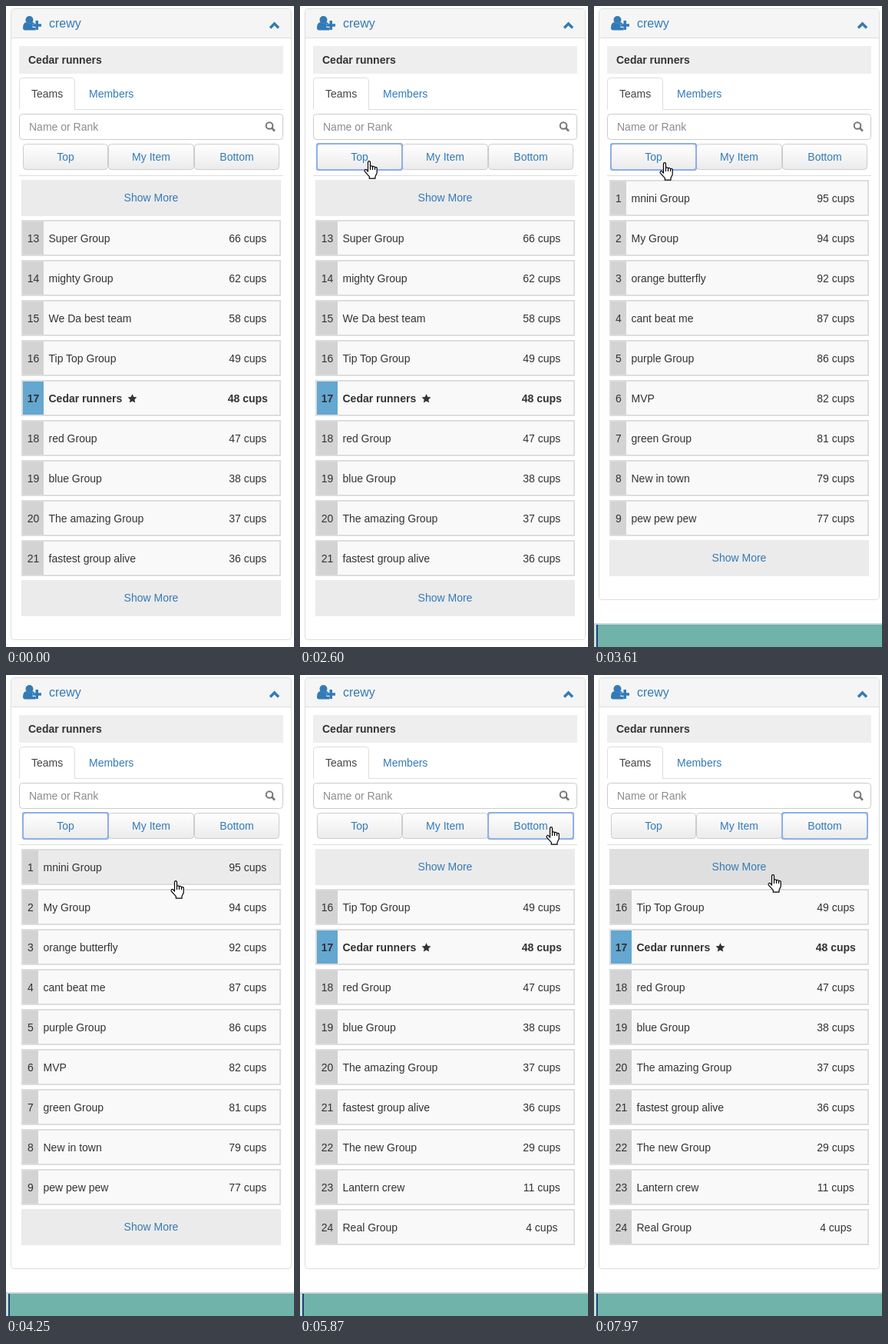
Recreate the animation shown at these times as an HTML page. Size 375 px wide and 833 px high, loop 8 s.

```html
<!DOCTYPE html>
<html lang="en">
<head>
<meta charset="utf-8">
<title>Team ranking</title>
<style>
html, body { margin: 0; width: 100%; height: 100%; overflow: hidden; background: #fff }
svg { display: block; font: 14px "Liberation Sans", Arial, sans-serif; fill: #333 }
.link { fill: #337ab7 }
.mid { text-anchor: middle }
.bold { font-weight: bold }
.line { fill: none; stroke: #ddd }
</style>
</head>
<body>
<svg width="375" height="833" viewBox="0 0 375 833">
  <defs>
    <linearGradient id="shade" x2="0" y2="1">
      <stop stop-color="#fff"/><stop offset="1" stop-color="#ebebeb"/>
    </linearGradient>
  </defs>
  <g id="strip">
    <path fill="#c9d9d6" d="M0 802h375v2H0z"/>
    <path fill="#70b3aa" d="M0 804h375v29H0z"/>
    <path fill="#c4dfda" d="M0 804h3v29H0z"/>
    <path fill="#1f3f7a" d="M3 804h2v29H3z"/>
  </g>
  <rect id="panel" x="6.5" y="3.5" width="365" rx="4" fill="#fff" stroke="#ddd"/>
  <path d="M7 41V8q0-4 4-4h356q4 0 4 4v33z" fill="#f5f5f5"/>
  <path class="line" d="M7 41.5h364M17 220.5h344"/>
  <g class="link">
    <circle cx="30.5" cy="18" r="5"/>
    <path d="M22 28.5q0-7 4.5-7.5 4 3.500 8 0 2 .3 3 2h-3v5h4v3.500H25q-3 0-3-3z"/>
    <path d="M38.500 19h3.500v4.200h4v3.500h-4V31h-3.500v-4.300h-4v-3.500h4z"/>
    <text x="56" y="28" font-size="16">crewy</text>
  </g>
  <path d="M344 28.500l5.500-5.500 5.500 5.500" fill="none" stroke="#337ab7" stroke-width="3.400"/>
  <path fill="#eee" d="M17 52h344v36H17z"/>
  <text class="bold" x="29" y="75">Cedar runners</text>
  <path class="line" d="M17.500 134.500V97.500q0-4 4-4h64q4 0 4 4v37H361"/>
  <text x="33" y="119" fill="#444">Teams</text>
  <text class="link" x="108" y="119">Members</text>
  <rect x="17.500" y="140.500" width="343" height="33" rx="4" fill="#fff" stroke="#ccc"/>
  <text x="30" y="162" fill="#8c8c8c">Name or Rank</text>
  <g fill="none" stroke="#777" stroke-width="2">
    <circle cx="343" cy="155.500" r="4.300"/><path d="M346 158.500l4 4" stroke-width="2.500"/>
  </g>
  <g id="buttons"></g>
  <rect id="ring" y="179" width="111" height="34" rx="2" fill="none" stroke="#8eaeea" stroke-width="2"/>
  <g id="list"></g>
  <g id="hand" fill="#fff" stroke="#000" stroke-width="1.200" stroke-linejoin="round">
    <path d="M5.500 14V2.200a1.500 1.500 0 0 1 3 0V8a1.500 1.500 0 0 1 3 .6 1.500 1.500 0 0 1 3 .8 1.400 1.400 0 0 1 2.700 1.100V16l-2.200 4.500v2.700H7.300v-2.500L1.200 13.800a1.600 1.600 0 0 1 2.400-2z"/>
    <path d="M8.500 8v4M11.500 8.600V12M14.500 9.400V12" fill="none"/>
  </g>
</svg>
<script>
const $ = id => document.getElementById(id);

// [name, cups] by rank
const teams = {};
const addTeams = (rank, text) => text.split(", ").forEach((s, i) => {
  const [, name, cups] = s.match(/(.+) (\d+)/);
  teams[rank + i] = { name, cups };
});
addTeams(1, "mnini Group 95, My Group 94, orange butterfly 92, cant beat me 87, purple Group 86, MVP 82, green Group 81, New in town 79, pew pew pew 77");
addTeams(13, "Super Group 66, mighty Group 62, We Da best team 58, Tip Top Group 49, Cedar runners 48, red Group 47, blue Group 38, The amazing Group 37, fastest group alive 36, The new Group 29, Lantern crew 11, Real Group 4");
const MINE = 17, TOP = 226, PITCH = 52, ROW = 47;

const views = [
  { at: 0, first: 13, above: true, below: true },
  { at: 2830, first: 1, below: true },
  { at: 5870, first: 16, above: true }
];
// Cursor runs: start, end, number of steps
const runs = [[1140, 2220, 14], [3610, 4940, 17], [7490, 7970, 6]];
// Cursor keys: time, x, y
const keys = [
  [1140, 337, 549], [1450, 117, 435], [1680, 60, 320], [1910, 82, 210], [2220, 83, 201],
  [3530, 83, 201], [4120, 170, 263], [4400, 278, 260], [4940, 320, 197],
  [7410, 320, 197], [7970, 226, 259]
];

const text = (x, y, s, cls = "") => `<text x="${x}" y="${y}" class="${cls}">${s}</text>`;
const rect = (x, y, w, h, fill) => `<rect x="${x}" y="${y}" width="${w}" height="${h}" fill="${fill}"/>`;

$("buttons").innerHTML = [["Top", 22, 111], ["My Item", 133, 112], ["Bottom", 245, 111]].map(([s, x, w]) =>
  `<rect x="${x + .5}" y="179.5" width="${w - 1}" height="33" rx="4" fill="url(#shade)" stroke="#ccc"/>` +
  text(x + w / 2, 201, s, "link mid")).join("");

const more = (y, hot) => rect(20, y, 338, ROW, hot ? "#dfdfdf" : "#ebebeb") +
  text(189, y + 28, "Show More", "link mid");

function row(rank, y, hot) {
  const { name, cups } = teams[rank], mine = rank == MINE, w = rank < 10 ? 20 : 27;
  const bold = mine ? "bold" : "";
  return rect(20, y, 338, ROW, "#ddd") + rect(22, y + 2, 334, ROW - 4, hot ? "#ebebeb" : "#f9f9f9") +
    rect(22, y + 2, w, ROW - 4, mine ? "#64a7d1" : "#d3d3d3") +
    text(22 + w / 2, y + 29, rank, "mid " + bold) +
    text(w + 28.5, y + 29, name, bold) + text(314.8, y + 29, cups + " cups", "mid " + bold) +
    (mine ? `<path d="${star(164.5, y + 24.5, 6.3)}"/>` : "");
}

function star(x, y, r) {
  const points = Array.from({ length: 10 }, (_, i) => {
    const a = i * Math.PI / 5, d = i % 2 ? r * .47 : r;
    return (x + d * Math.sin(a)).toFixed(2) + " " + (y - d * Math.cos(a)).toFixed(2);
  });
  return "M" + points.join("L") + "z";
}

function drawList(view, hot) {
  let slot = 0, out = "";
  const add = draw => { out += draw(TOP + PITCH * slot, slot == hot); slot++; };
  if (view.above) add(more);
  for (let i = 0; i < 9; i++) add((y, h) => row(view.first + i, y, h));
  if (view.below) add(more);
  return out;
}

// Smooth curve through the keys, at rest where two neighbours agree
function slope(i, c) {
  const a = keys[Math.max(i - 1, 0)], k = keys[i], b = keys[Math.min(i + 1, keys.length - 1)];
  const still = p => p != k && p[1] == k[1] && p[2] == k[2];
  return still(a) || still(b) ? 0 : (b[c] - a[c]) / (b[0] - a[0]);
}

function cursorAt(t) {
  let i = keys.findLastIndex(k => k[0] <= t);
  i = Math.min(i, keys.length - 2);
  const a = keys[i], b = keys[i + 1], d = b[0] - a[0], u = Math.min(1, (t - a[0]) / d), v = 1 - u;
  return [1, 2].map(c => Math.round(
    v * v * (1 + 2 * u) * a[c] + u * u * (3 - 2 * u) * b[c] +
    d * u * v * (v * slope(i, c) - u * slope(i + 1, c))));
}

function cursor(t) {
  const run = runs.findLast(r => t >= r[0]);
  if (!run) return null;
  const [a, b, n] = run, step = Math.min(n, Math.floor((t - a) / (b - a) * n + .05));
  return cursorAt(a + step * (b - a) / n);
}

let shown;
function frame() {
  const t = performance.now() % 8000;
  const view = views.findLast(v => t >= v.at), pos = cursor(t);
  let hot = -1;
  if (pos) {
    const y = pos[1] - TOP;
    if (y >= 0 && y % PITCH < ROW) hot = Math.floor(y / PITCH);
    $("hand").setAttribute("transform", `translate(${pos})`);
  }
  $("hand").style.display = pos ? "" : "none";
  $("ring").style.display = t < 2600 ? "none" : "";
  $("ring").setAttribute("x", t < 5720 ? 22 : 245);
  const state = view.at + "/" + hot;
  if (state != shown) {
    shown = state;
    $("list").innerHTML = drawList(view, hot);
    $("strip").style.display = view.at ? "" : "none";
    $("panel").setAttribute("height", view.at ? 768 : 820);
  }
  requestAnimationFrame(frame);
}
frame();
</script>
</body>
</html>
```
